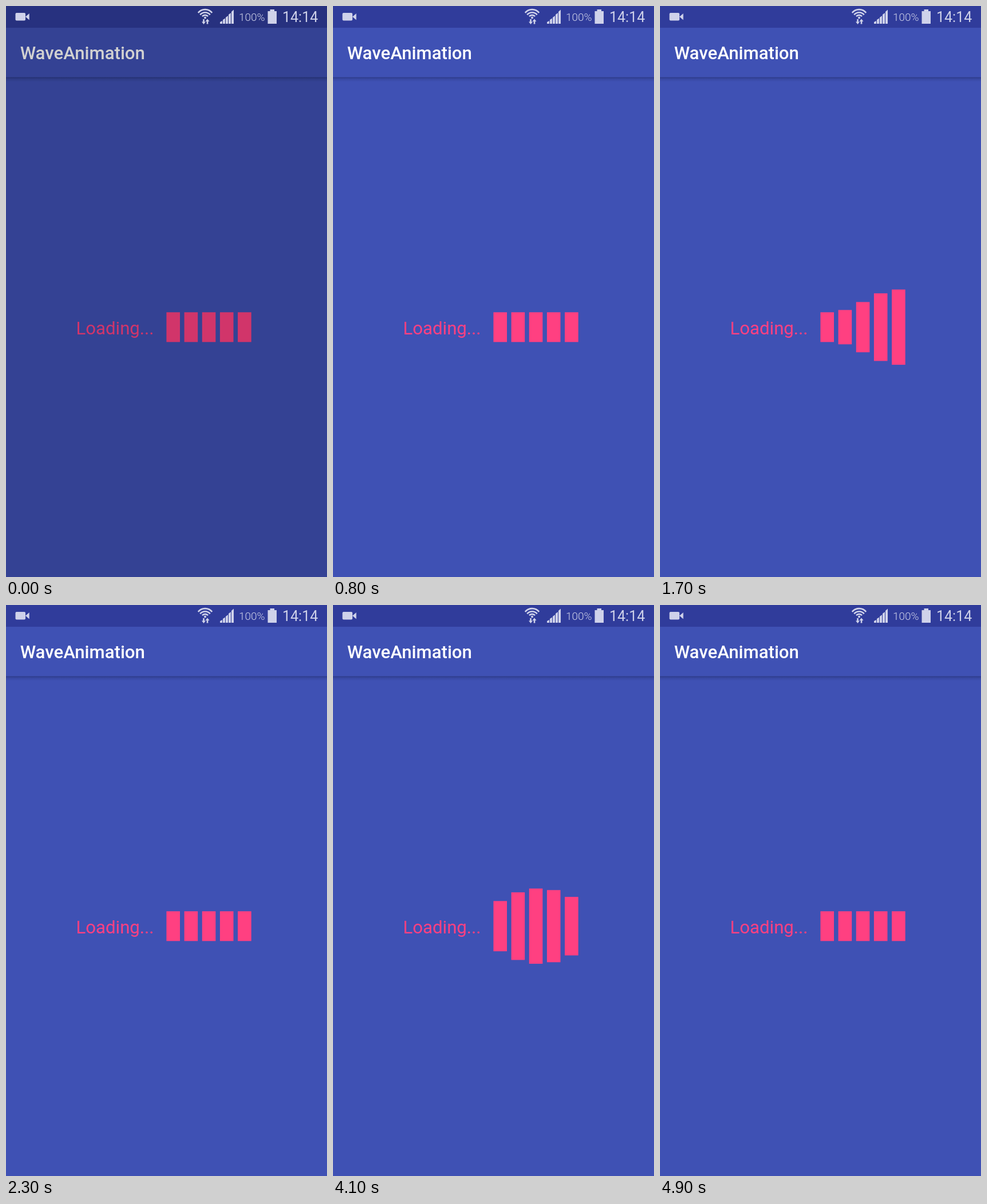
An HTML page that plays this animation: 561x998 px, repeating every 5100 ms.

```html
<!DOCTYPE html>
<html lang="en">
<head>
<meta charset="utf-8">
<title>WaveAnimation</title>
<style>
  html, body { margin: 0; height: 100%; overflow: hidden; background: #3f51b4; }
  svg { display: block; width: 561px; height: 998px; font-family: Roboto, sans-serif; }
</style>
</head>
<body>
<svg viewBox="0 0 561 998">
  <defs>
    <linearGradient id="shadow" x2="0" y2="1">
      <stop offset="0" stop-color="#1c2660" stop-opacity=".55"/>
      <stop offset=".35" stop-color="#1c2660" stop-opacity=".22"/>
      <stop offset="1" stop-color="#1c2660" stop-opacity="0"/>
    </linearGradient>
  </defs>
  <rect width="561" height="998" fill="#3f51b4"/>
  <rect y="124.5" width="561" height="8" fill="url(#shadow)"/>
  <rect width="561" height="38" fill="#303c9b"/>
  <text x="24.7" y="93" font-size="31.17" font-weight="500" fill="#fff">WaveAnimation</text>
  <text x="122.5" y="573.5" font-size="31.17" fill="#ff4081">Loading...</text>
  <g id="bars" fill="#ff4081"></g>
  <rect id="dim" width="561" height="998" opacity=".18"/>

  <g fill="#cfd2ea">
    <rect x="16.5" y="12" width="17.5" height="13.5" rx="2"/>
    <path d="M34 18.7L40.7 13V24.5Z"/>
    <g fill="none" stroke="#cfd2ea" stroke-width="2.6">
      <path d="M335.8 11.8A16 16 0 0 1 360.2 11.8"/>
      <path d="M339.3 15.3A11.3 11.3 0 0 1 356.7 15.3"/>
      <path d="M343 18.2A6.6 6.6 0 0 1 353 18.2"/>
    </g>
    <circle cx="348" cy="20.5" r="1.9"/>
    <g id="arrows">
      <path d="M344.2 23h2.6v4.5h2.2l-3.5 4.5l-3.5-4.5h2.2z"/>
      <path d="M350.7 31.5h2.6v-4.5h2.2l-3.5-4.5l-3.5 4.5h2.2z"/>
    </g>
    <path d="M374 31v-3l4-2v5zM379 31v-7l4-2.500v9.500zM384 31v-11l4-3v14zM389 31v-16l4-3v19zM394 31v-21l4-3.500v24.500z"/>
    <path d="M457.500 31V9h4V6h7.500v3h4V31z"/>
    <text x="407" y="26" font-size="19" font-weight="300">100%</text>
    <text x="483" y="28" font-size="25">14:14</text>
  </g>
</svg>
<script>
const LOOP = 5100, STEP = 100, WAVES = [863, 3463];
const REST = 52, GROWTH = 79.5, MIDDLE = 561.3;
const $ = id => document.getElementById(id);

const bars = Array.from({ length: 5 }, (_, i) => {
  const bar = document.createElementNS("http://www.w3.org/2000/svg", "rect");
  bar.setAttribute("x", 280.4 + i * 31.17);
  bar.setAttribute("width", 23.6);
  return $("bars").appendChild(bar);
});

const ease = x => (1 - Math.cos(Math.PI * Math.min(1, Math.max(0, x)))) / 2;
const swell = t => ease(t / 405) - ease((t - 435) / 380);

function draw(t) {
  bars.forEach((bar, i) => {
    const grow = WAVES.reduce((sum, start) => sum + swell(t - start - i * 100), 0);
    const h = REST + GROWTH * grow;
    bar.setAttribute("y", MIDDLE - h / 2);
    bar.setAttribute("height", h);
  });
  $("dim").style.display = t < 100 ? "" : "none";
  $("arrows").setAttribute("opacity", t >= 3000 && t < 4100 ? 0.45 : 1);
}

const begin = performance.now();
function tick() {
  const t = (performance.now() - begin) % LOOP;
  draw(Math.floor(t / STEP) * STEP);
  requestAnimationFrame(tick);
}
tick();
</script>
</body>
</html>
```
